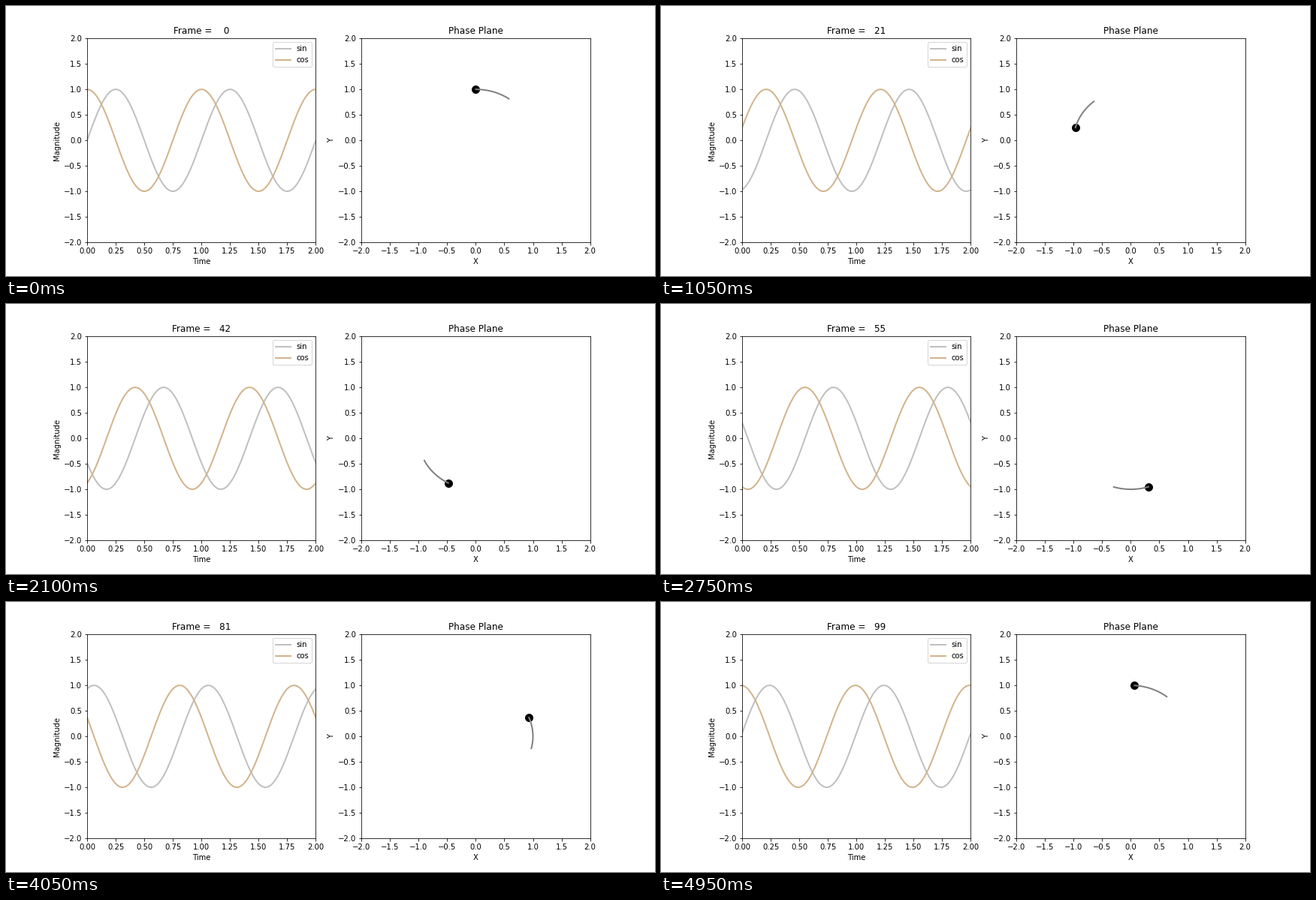
These frames come from a looping animation (864 px wide and 360 px high, 5000 ms). A matplotlib script:

```python
import numpy as np
import matplotlib.pyplot as plt
from matplotlib.animation import FuncAnimation

FRAMES = 100
INTERVAL = 50  # ms
TRAIL = 50     # samples shown behind the dot

plt.rcParams.update({"font.family": "DejaVu Sans", "font.size": 10})

t = np.linspace(0, 2, 1000)

fig, (wave_ax, phase_ax) = plt.subplots(1, 2, figsize=(12, 5), dpi=72)
fig.subplots_adjust(left=0.125, right=0.9, bottom=0.125, top=0.88, wspace=0.2)

wave_ax.set(xlim=(0, 2), ylim=(-2, 2), xlabel="Time", ylabel="Magnitude")
phase_ax.set(xlim=(-2, 2), ylim=(-2, 2), xlabel="X", ylabel="Y",
             title="Phase Plane")

title = wave_ax.set_title("")
sin_line, = wave_ax.plot([], [], color="silver", lw=2, label="sin")
cos_line, = wave_ax.plot([], [], color="tan", lw=2, label="cos")
wave_ax.legend(loc="upper right")

dot, = phase_ax.plot([], [], "ko", ms=10)
trail, = phase_ax.plot([], [], color="gray", lw=2)


def update(i):
    angle = 2 * np.pi * (t - i / FRAMES)
    x, y = np.sin(angle), np.cos(angle)
    sin_line.set_data(t, x)
    cos_line.set_data(t, y)
    dot.set_data(x[:1], y[:1])
    trail.set_data(x[:TRAIL], y[:TRAIL])
    title.set_text(f"Frame = {i:4d}")
    return sin_line, cos_line, dot, trail, title


anim = FuncAnimation(fig, update, frames=FRAMES, interval=INTERVAL,
                     repeat=True, repeat_delay=0, blit=False)
plt.show()
```
